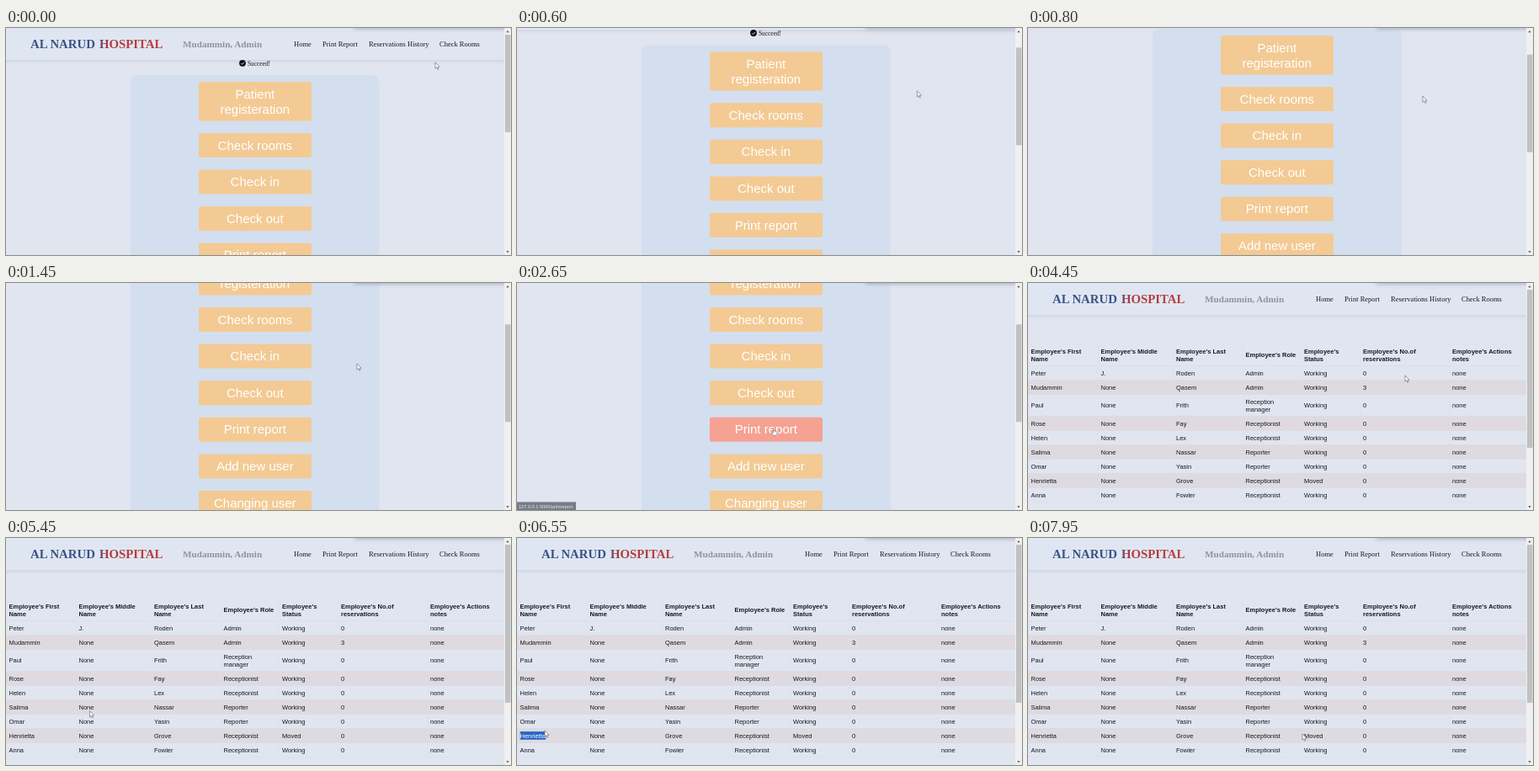
Animation, 600 px wide and 270 px high, one loop 8 s. Source, as an HTML page:

```html
<!DOCTYPE html>
<html lang="en">
<head>
<meta charset="utf-8">
<title>Admin pages</title>
<style>
  html, body { margin: 0; width: 100%; height: 100%; overflow: hidden; background: #e0e5f0; }
  svg { display: block; width: 100vw; height: 100vh; }
  .sans { font-family: "Liberation Sans", Arial, sans-serif; }
  .serif { font-family: "Liberation Serif", "Times New Roman", serif; }
  text { white-space: pre; }
</style>
</head>
<body>
<svg id="stage" viewBox="0 0 600 270" xmlns="http://www.w3.org/2000/svg">
  <defs>
    <linearGradient id="brand" gradientUnits="userSpaceOnUse" x1="29" y1="0" x2="187" y2="0">
      <stop offset=".5" stop-color="#3a5286"/>
      <stop offset=".58" stop-color="#ad3b41"/>
      <stop offset="1" stop-color="#bb403d"/>
    </linearGradient>
    <filter id="drop" x="-5%" y="-20%" width="110%" height="160%">
      <feDropShadow dx="0" dy="1" stdDeviation="2" flood-color="#56657f" flood-opacity=".2"/>
    </filter>
    <filter id="soft" x="-10%" y="-100%" width="120%" height="400%">
      <feGaussianBlur stdDeviation="2.4"/>
    </filter>
    <clipPath id="picked"><rect id="pickClip" x="3.5" y="229" height="12" width="0"/></clipPath>
  </defs>
  <rect width="600" height="270" fill="#e0e5f0"/>
  <g id="menu"></g>
  <g id="table"></g>
  <rect x="414" y="-6" width="190" height="7" fill="#7d8594" opacity=".6" filter="url(#soft)"/>
  <g id="status" class="sans">
    <rect y="260.5" width="70" height="9.5" fill="#757c87"/>
    <text x="2" y="267.5" font-size="5.6" fill="#e6e9ee">127.0.0.1:5000/printreport</text>
  </g>
  <g id="bar">
    <rect x="592" width="8" height="270" fill="#f0f0f1"/>
    <rect id="thumb" x="593" width="6.5" fill="#c1c1c2"/>
    <path d="M594.3 5.2h3.4L596 3zM594.3 265.3h3.4L596 267.5z" fill="#555"/>
  </g>
  <path id="arrow" d="M0 0V7.2L1.7 5.7L2.9 8.3L4 7.8L2.9 5.3H5.1Z" fill="#fff" stroke="#555b68" stroke-width=".6"/>
  <path id="hand" d="M1.4 0.4Q2.2 -.2 2.7 .6V3L5.3 3.6Q6.2 4 6 5.2L5.3 8.4H1.6L-.6 5.3Q-.5 4.2 1.3 5.2Z" fill="#fff" stroke="#555b68" stroke-width=".6"/>
</svg>
<script>
const NS = "http://www.w3.org/2000/svg";
const LOOP = 8000, STEP = 50, PAGE_CHANGE = 2950;
const $ = id => document.getElementById(id);

function add(parent, tag, attrs, content) {
  const el = document.createElementNS(NS, tag);
  for (const k in attrs) el.setAttribute(k, attrs[k]);
  if (content) el.textContent = content;
  parent.appendChild(el);
  return el;
}
const rect = (p, x, y, width, height, fill, more) =>
  add(p, "rect", { x, y, width, height, fill, ...more });
const label = (p, x, y, size, fill, str, more) =>
  add(p, "text", { x, y, "font-size": size, fill, ...more }, str);

function header(page) {
  const g = add(page, "g", { class: "serif" });
  rect(g, -10, -10, 612, 48, "#e0e6f1", { filter: "url(#drop)" });
  const bold = { "font-weight": 700 };
  label(g, 29, 24, 14.8, "url(#brand)", "AL NARUD", bold);
  label(g, 111, 24, 14.8, "url(#brand)", "HOSPITAL", bold);
  label(g, 210, 23, 11.15, "#8f949f", "Mudammin, Admin", bold);
  [[342, "Home"], [376, "Print Report"], [431, "Reservations History"], [515, "Check Rooms"]]
    .forEach(([x, s]) => label(g, x, 22, 8.5, "#17191e", s));
}

function buildMenu(page) {
  header(page);
  add(page, "circle", { cx: 281, cy: 41.8, r: 3.9, fill: "#0c0d10" });
  add(page, "path", { d: "M279.2 42l1.3 1.3 2.5-2.7", fill: "none", stroke: "#fff", "stroke-width": 0.9 });
  label(page, 287, 44.5, 7.4, "#1a1c22", "Succeed!", { class: "serif" });
  rect(page, 148, 56, 295.5, 500, "#d3dfef", { rx: 8 });

  const g = add(page, "g", { class: "sans", "text-anchor": "middle" });
  const names = ["Patient|registeration", "Check rooms", "Check in", "Check out",
    "Print report", "Add new user", "Changing user|status"];
  let y = 64, target;
  for (const name of names) {
    const lines = name.split("|"), tall = lines.length > 1;
    const box = rect(g, 229, y, 134, tall ? 46.4 : 29, "#f3ca94", { rx: 2 });
    lines.forEach((s, i) => label(g, 295.8, y + 19.6 + 18 * i, 15, "#fff", s));
    if (name === "Print report") target = box;
    y += tall ? 61 : 43.6;
  }
  return target;
}

function buildTable(page) {
  header(page);
  const g = add(page, "g", { class: "sans" });
  const cols = [3.5, 86.5, 176, 258.5, 328, 398, 504];
  const ink = "#17191e";
  const heads = ["Employee's First|Name", "Employee's Middle|Name", "Employee's Last|Name",
    "Employee's Role", "Employee's|Status", "Employee's No.of|reservations", "Employee's Actions|notes"];
  const people = ["Peter,J.,Roden,Admin", "Mudammin,,Qasem,Admin,,3", "Paul,,Frith,Reception|manager",
    "Rose,,Fay", "Helen,,Lex", "Salima,,Nassar,Reporter", "Omar,,Yasin,Reporter",
    "Henrietta,,Grove,,Moved", "Anna,,Fowler"];
  const blanks = ["", "None", "", "Receptionist", "Working", "0", "none"];

  function cells(row, mid, more) {
    row.forEach((str, c) => {
      const lines = str.split("|");
      lines.forEach((s, i) =>
        label(g, cols[c], mid + 2.7 + 9 * (i - (lines.length - 1) / 2), 7.5, ink, s, more));
    });
  }
  cells(heads, 85.5, { "font-weight": 700 });

  let y = 98.5;
  people.forEach((line, r) => {
    const row = line.split(",");
    const h = line.includes("|") ? 26 : 17;
    if (r % 2) rect(g, 0, y, 592, h, "#dedadf");
    rect(g, 0, y - 0.3, 592, 0.6, "#d5dded");
    cells(blanks.map((b, c) => row[c] || b), y + h / 2);
    y += h;
  });
  for (const x of cols.slice(1)) rect(g, x - 3.2, 72, 0.6, y - 72, "#d9e1ef", { opacity: 0.6 });
  rect(g, 0, 72, 592, 0.5, "#d9e1ef");
  rect(g, 0, y, 592, 0.5, "#d5dded");

  const pick = add(g, "g", { "clip-path": "url(#picked)" });
  rect(pick, 3.5, 230.2, 31, 9.6, "#2566c4");
  label(pick, 3.5, 237.7, 7.5, "#fff", "Henrietta");
}

const ease = u => u * u * (3 - 2 * u);
const clamp = u => u < 0 ? 0 : u > 1 ? 1 : u;

// keys: [time, value...]
function track(keys, t, curve = ease) {
  let i = 0;
  while (i < keys.length - 2 && t >= keys[i + 1][0]) i++;
  const [a, b] = [keys[i], keys[i + 1]];
  const u = curve(clamp((t - a[0]) / (b[0] - a[0])));
  return a.slice(1).map((v, k) => v + (b[k + 1] - v) * u);
}

const pointer = [
  [0, 510, 41], [800, 469, 81], [1300, 417, 96], [1500, 417, 96], [2250, 366, 160],
  [2550, 303, 173], [3200, 303, 173], [3950, 425, 128], [4450, 448, 110], [4850, 388, 118],
  [5650, 46, 222], [5950, 4, 233], [6100, 4, 233], [6450, 33, 229], [6850, 33, 229],
  [7400, 210, 235], [7850, 326, 233], [8000, 326, 233]
];
const scrolling = [[350, 0], [550, 31], [800, 55], [1200, 96]];

const hot = buildMenu($("menu"));
buildTable($("table"));

const show = (el, on) => el.setAttribute("display", on ? "inline" : "none");

function draw(t) {
  const onMenu = t < PAGE_CHANGE;
  const [x, y] = track(pointer, t);
  const [scroll] = track(scrolling, t, u => u);

  show($("menu"), onMenu);
  show($("table"), !onMenu);
  $("menu").setAttribute("transform", `translate(0 ${-scroll})`);
  $("thumb").setAttribute("y", onMenu ? 8 + scroll * 0.43 : 8);
  $("thumb").setAttribute("height", onMenu ? 116 : 188);

  const glow = clamp((t - 2300) / 200);
  const mix = (a, b) => Math.round(a + (b - a) * glow);
  hot.setAttribute("fill", `rgb(${mix(243, 245)},${mix(202, 162)},${mix(148, 146)})`);
  show($("status"), t >= 2350 && t < 3200);

  const dragging = t >= 6100 && t < 6950;
  $("pickClip").setAttribute("width", dragging ? clamp((x - 4) / 29) * 31 : 0);

  const pointing = t >= 2300 && onMenu;
  show($("hand"), pointing);
  show($("arrow"), !pointing);
  $(pointing ? "hand" : "arrow").setAttribute("transform", `translate(${x} ${y})`);
}

const start = performance.now();
function tick(now) {
  const t = now < start ? 0 : (now - start) % LOOP;
  draw(Math.floor(t / STEP) * STEP);
  requestAnimationFrame(tick);
}
draw(0);
requestAnimationFrame(tick);
</script>
</body>
</html>
```
